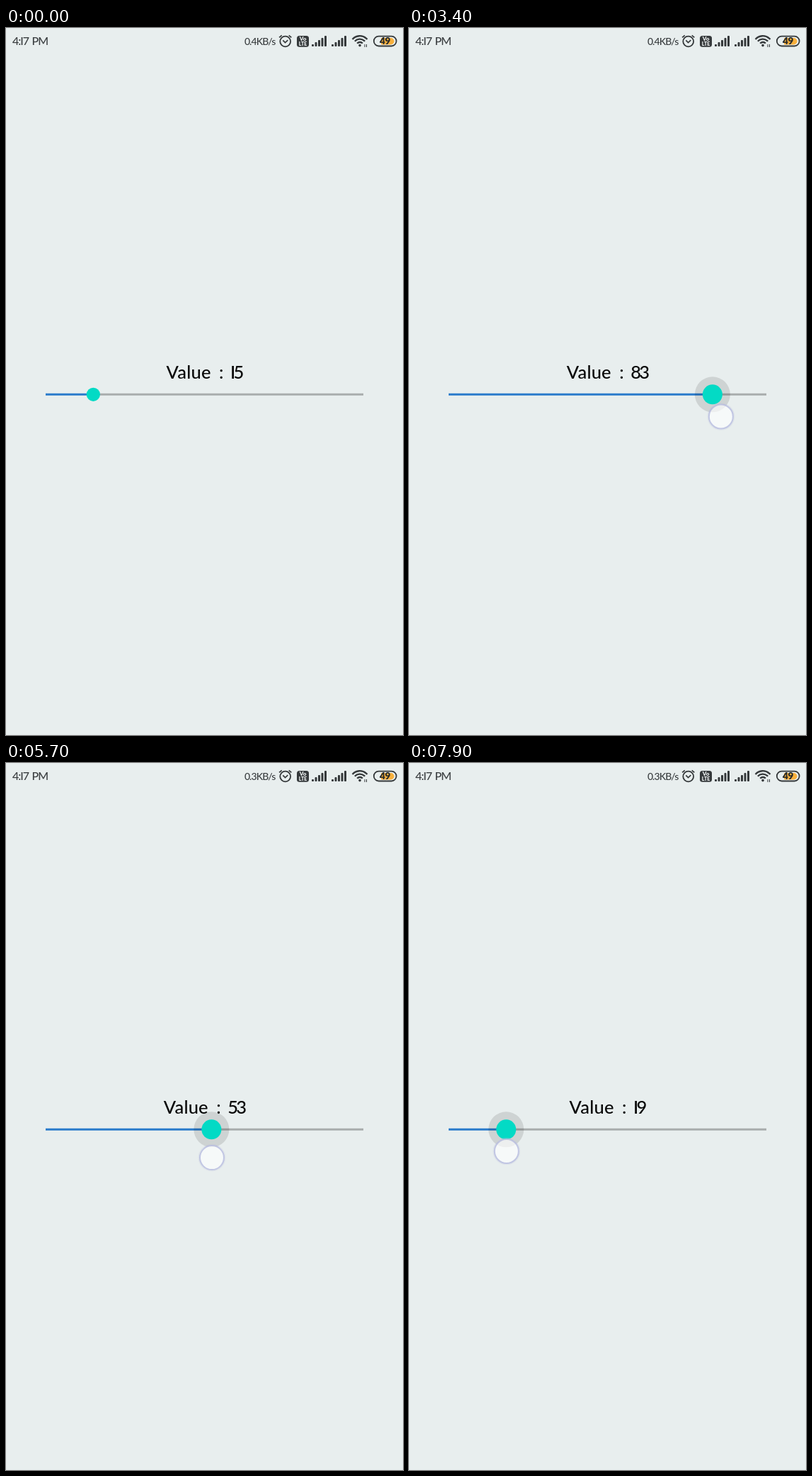
These frames come from a looping animation (561 px wide and 998 px high, 8000 ms). An HTML page with a canvas:

```html
<!DOCTYPE html>
<html lang="en">
<head>
<meta charset="utf-8">
<title>Slider</title>
<style>
  html, body { margin: 0; width: 100%; height: 100%; overflow: hidden; background: #e8eeee; }
  canvas { display: block; }
</style>
</head>
<body>
<canvas id="stage" width="561" height="998"></canvas>
<script>
const ctx = document.getElementById('stage').getContext('2d');
const LOOP = 8000, STEP = 100;
const TRACK = { left: 56, right: 505, y: 517.3 };
const INK = '#35393b', STATUS_INK = '#3a3e40';
const RIGHTWARD = { down: 1700, drag: 1900, up: 4200 };
const LEFTWARD = { down: 4500, drag: 4800, settle: 5800, end: 7900 };

// Progress from 0 to 1 between two times.
const span = (t, from, to) => Math.min(1, Math.max(0, (t - from) / (to - from)));
const easeInOut = p => (1 - Math.cos(Math.PI * p)) / 2;
const easeOut = p => Math.sin(Math.PI / 2 * p);
const trackX = value => TRACK.left + (TRACK.right - TRACK.left) * value / 100;

// Where the finger aims on the first drag; it overshoots the track's end.
const aim = t => 17 + 86 * easeInOut(span(t, RIGHTWARD.down, RIGHTWARD.up));

function valueAt(t) {
  if (t < RIGHTWARD.drag) return 15;
  if (t < LEFTWARD.drag) return Math.min(100, aim(t));
  const sweep = easeInOut(span(t, LEFTWARD.drag, LEFTWARD.settle));
  const creep = span(t, LEFTWARD.settle, LEFTWARD.end) ** 1.15;
  return 100 - 49 * sweep - 32.9 * creep;
}

function pressAt(t) {
  return t < LEFTWARD.down
    ? span(t, RIGHTWARD.drag, 2200) - span(t, 3800, 4100)
    : span(t, LEFTWARD.drag, 5100);
}

function fingerAt(t) {
  if (t >= RIGHTWARD.down && t < RIGHTWARD.up)
    return { x: trackX(aim(t)) + 12, y: 521 + 40.5 * span(t, RIGHTWARD.down, RIGHTWARD.up) };
  if (t >= LEFTWARD.down)
    return {
      x: Math.min(499.3, trackX(valueAt(t)) + 0.6),
      y: 523 + 35 * easeOut(span(t, LEFTWARD.down, 5900)) - 10 * span(t, 5900, LEFTWARD.end) ** 2
    };
  return null;
}

function disc(x, y, r, color) {
  ctx.beginPath();
  ctx.arc(x, y, r, 0, 2 * Math.PI);
  ctx.fillStyle = color;
  ctx.fill();
}

function ring(x, y, r, width, color, from = 0, to = 2 * Math.PI) {
  ctx.beginPath();
  ctx.arc(x, y, r, from, to);
  ctx.lineWidth = width;
  ctx.strokeStyle = color;
  ctx.stroke();
}

function line(width, color, ...points) {
  ctx.beginPath();
  points.forEach(([x, y]) => ctx.lineTo(x, y));
  ctx.lineWidth = width;
  ctx.strokeStyle = color;
  ctx.stroke();
}

function pill(x, y, w, h, r) {
  ctx.beginPath();
  ctx.roundRect(x, y, w, h, r);
}

function setFont(font, spacing = 0) {
  ctx.font = font + ' Lato, sans-serif';
  ctx.letterSpacing = spacing + 'px';
}

function text(str, x, y, color, align = 'left') {
  ctx.textAlign = align;
  ctx.fillStyle = color;
  ctx.fillText(str, x, y);
}

// The typeface shows the digit one as a plain bar.
const barOnes = str => String(str).replace(/1/g, 'I');

function drawAlarm(x, y) {
  ring(x, y, 7.4, 1.8, INK);
  for (const side of [-1, 1])
    line(1.8, INK, [x + side * 8.6, y - 5.6], [x + side * 5, y - 8.6]);
  line(1.7, INK, [x - 3.4, y - 1.6], [x - 0.2, y + 1.6], [x + 3.6, y - 1.8]);
}

function drawBadge() {
  pill(411, 11, 17, 15.7, 3.5);
  ctx.fillStyle = INK;
  ctx.fill();
  setFont('900 8px');
  text('Vo', 419.5, 18.4, '#eef2f2', 'center');
  setFont('900 7px');
  text('LTE', 419.5, 25.2, '#eef2f2', 'center');
}

function drawSignal(x) {
  ctx.fillStyle = INK;
  for (let i = 0; i < 5; i++) {
    const h = 3 + i * 3;
    pill(x + i * 4.5, 26 - h, 3, h, 1);
    ctx.fill();
  }
}

function drawWifi(x, y) {
  const mid = -Math.PI / 2;
  for (let r = 5; r < 15; r += 4.4)
    ring(x, y, r, 2.3, INK, mid - 0.86, mid + 0.86);
  disc(x, y - 0.4, 1.8, INK);
  for (const dx of [7, 9.5])
    line(1, INK, [x + dx, y - 2], [x + dx, y + 2]);
}

function drawBattery() {
  pill(530, 14, 18.5, 9.5, [1, 5, 5, 1]);
  ctx.fillStyle = '#f8b03c';
  ctx.fill();
  pill(519.8, 11.7, 31.8, 13.8, 6.9);
  ctx.lineWidth = 1.8;
  ctx.strokeStyle = INK;
  ctx.stroke();
  setFont('900 13.5px', -0.3);
  text('49', 535.6, 23.4, '#24282a', 'center');
}

function drawStatus(t) {
  setFont('500 16px', -1);
  text(barOnes('4:17'), 9, 24, STATUS_INK);
  text('PM', 36.5, 24, STATUS_INK);
  setFont('500 14px', -0.9);
  text(t < 3700 ? '0.4KB/s' : '0.3KB/s', 380.5, 24, STATUS_INK, 'right');
  drawAlarm(394.7, 19);
  drawBadge();
  drawSignal(432);
  drawSignal(460);
  drawWifi(500, 25);
  drawBattery();
}

function drawLabel(value, falling) {
  const shown = falling ? Math.min(100, Math.floor(value) + 1) : Math.round(value);
  const digits = barOnes(shown), gap = 90.5;
  setFont('500 25.5px', -2.8);
  const left = 280 - (gap + ctx.measureText(digits).width) / 2;
  text(digits, left + gap, 495, '#080808');
  setFont('500 25.5px', 0.2);
  text('Value', left, 495, '#080808');
  text(':', left + 74.5, 495, '#080808');
}

function drawSlider(value, press) {
  const { left, right, y } = TRACK;
  const x = trackX(value);
  line(3, '#a9adad', [x, y], [right, y]);
  line(3, '#2b7bcb', [left, y], [x, y]);
  if (press > 0) disc(x, y, 25 * press, 'rgba(0,0,0,0.115)');
  disc(x, y, 9.6 + 4.4 * press, '#03dac5');
}

function drawFinger(finger) {
  if (!finger) return;
  const { x, y } = finger;
  disc(x, y, 17.5, 'rgba(255,255,255,0.64)');
  ring(x, y, 18.6, 1.5, 'rgba(190,196,220,0.25)');
  ring(x, y, 17, 2, 'rgba(170,176,218,0.68)');
}

function render(now) {
  const t = Math.floor(now % LOOP / STEP) * STEP;
  const value = valueAt(t);
  ctx.fillStyle = '#e8eeee';
  ctx.fillRect(0, 0, 561, 998);
  drawStatus(t);
  drawLabel(value, t > LEFTWARD.drag);
  drawSlider(value, pressAt(t));
  drawFinger(fingerAt(t));
}

const start = performance.now();
function tick() {
  render(performance.now() - start);
  requestAnimationFrame(tick);
}
tick();
</script>
</body>
</html>
```
